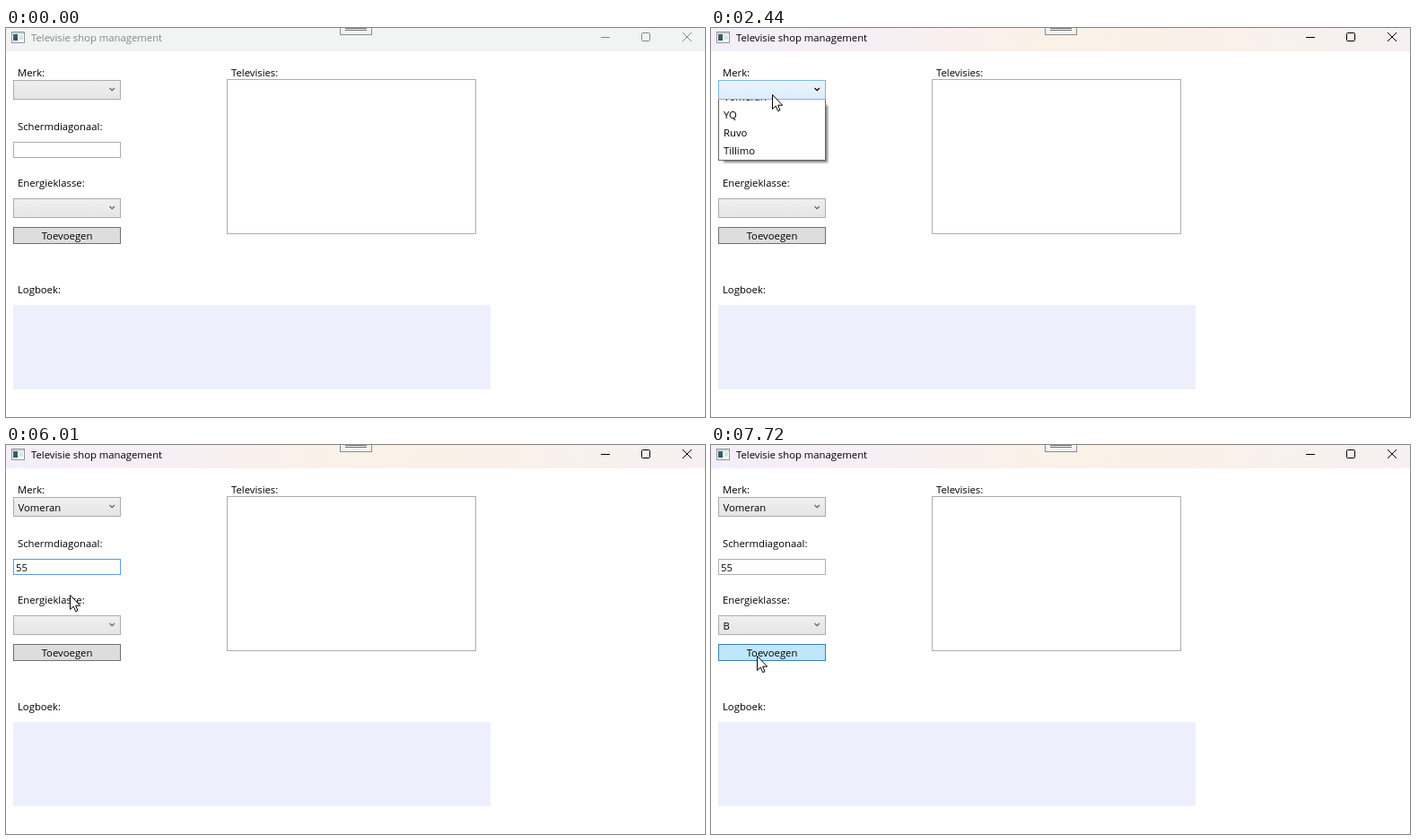
Write an HTML page with a canvas that moves like this. It is 779 px wide and 434 px high and loops after 8000 ms.

```html
<!DOCTYPE html>
<html lang="nl">
<head>
<meta charset="utf-8">
<title>Televisie shop management</title>
<style>
html, body { margin: 0; width: 100%; height: 100%; overflow: hidden; background: #fff; }
canvas { display: block; }
</style>
</head>
<body>
<canvas id="stage" width="779" height="434"></canvas>
<script>
const c = document.getElementById('stage').getContext('2d');
const LOOP = 8000, STEP = 66.1, START = 780;
const BRANDS = ['Vomeran', 'YQ', 'Ruvo', 'Tillimo'];
const CLASSES = [...'ABCDEF'];

// Pointer moves: start time, end time, goal x, goal y
const MOVES = [
  [780, 980, 547, 371],
  [1110, 1990, 73, 65],
  [2300, 2430, 68, 74],
  [2700, 2965, 60, 97],
  [3430, 3885, 74, 139],
  [4030, 4345, 74, 134],
  [5800, 6395, 66, 203],
  [6865, 7255, 54, 234],
  [7400, 7715, 51, 235]
];

let now, mouse;
const clamp = u => Math.min(1, Math.max(0, u));
const on = (from, to = LOOP) => now >= from - 20 && now < to - 20;

// Sideways speed is even, vertical speed eases out, so long moves bend.
function pointer() {
  let x = 676, y = 342;
  for (const [from, to, goalX, goalY] of MOVES) {
    const rest = 1 - clamp((now - from) / (to - from));
    x = goalX + (x - goalX) * rest;
    y = goalY + (y - goalY) * rest ** 1.6;
  }
  return { x: Math.round(x), y: Math.round(y), shown: on(780, 5080) || on(5870) };
}

function hover(top, bottom) {
  return mouse.shown && mouse.x >= 8 && mouse.x < 128 && mouse.y >= top && mouse.y < bottom;
}

function box(x, y, w, h, fill, edge) {
  c.fillStyle = fill;
  c.fillRect(x, y, w, h);
  if (!edge) return;
  c.strokeStyle = edge;
  c.lineWidth = 1;
  c.strokeRect(x + .5, y + .5, w - 1, h - 1);
}

function text(s, x, y, color = '#000') {
  c.fillStyle = color;
  c.fillText(s, x, y);
}

function line(d, color, width = 1) {
  c.strokeStyle = color;
  c.lineWidth = width;
  c.stroke(new Path2D(d));
}

function gradient(x0, y0, x1, y1, colors) {
  const g = c.createLinearGradient(x0, y0, x1, y1);
  colors.forEach((color, i) => g.addColorStop(i / (colors.length - 1), color));
  return g;
}

function titleBar() {
  const ink = on(2240) ? '#000' : '#868686';
  const mica = ['#f3eefa', '#f8eff3', '#faf2e6', '#f9f1ea', '#f6f0f2'];
  box(0, 0, 779, 26, on(2380) ? gradient(0, 0, 779, 0, mica) : '#f2f4f4');
  box(6, 4, 15, 13, '#fdfdfd', '#8d969a');
  box(7, 5, 13, 2, '#d0d6d9');
  box(8, 7, 5, 7, gradient(8, 7, 13, 14, ['#2f6a86', '#37504f']));
  box(15, 8, 4, 5, '#dde2e4');
  text('Televisie shop management', 28, 15, ink);
  line('M663 10.5h10', ink);
  line('M709.5 5.5h7q1 0 1 1v7q0 1-1 1h-7q-1 0-1-1v-7q0-1 1-1z', ink);
  line('M754 5l10 10M764 5l-10 10', ink);
  box(372, -2, 36, 10, '#f2f2f2', '#8c8c8c');
  line('M378 .5h24M378 2.5h24', '#777');
}

function combo(y, value) {
  const hot = hover(y, y + 22);
  const fill = hot ? ['#ecf4fc', '#dcecfc'] : ['#f0f0f0', '#e5e5e5'];
  box(8, y, 120, 22, gradient(0, y, 0, y + 22, fill), hot ? '#7eb4ea' : '#acacac');
  line(`M115.5 ${y + 9}l2.7 2.7l2.7-2.7`, hot ? '#000' : '#606060', 1.2);
  text(value, 13.5, y + 16);
}

// The list slides down out of the lower edge of its combo box.
function popup(y, items, opened) {
  const h = items.length * 20 + 2;
  const shown = Math.round(h * clamp((now - opened + 70) / 148));
  const top = y + shown - h;
  c.save();
  c.shadowColor = 'rgba(0,0,0,.5)';
  c.shadowBlur = 2.4;
  c.shadowOffsetX = c.shadowOffsetY = 1.8;
  box(12, y + 4, 116, shown - 4, '#fff');
  c.restore();

  c.save();
  c.beginPath();
  c.rect(8, y, 120, shown);
  c.clip();
  box(8, top, 120, h, '#fff', '#646464');
  items.forEach((item, i) => {
    const row = top + 1 + i * 20;
    if (hover(Math.max(row, y), row + 20))
      box(9, row, 118, 20, 'rgba(38,160,218,.12)', 'rgba(38,160,218,.66)');
    text(item, 14, row + 14);
  });
  c.restore();
}

function textBox() {
  const edge = on(4150, 6470) ? '#569de5' : hover(127, 145) ? '#7eb4ea' : '#abadb3';
  const value = on(5340) ? '55' : on(5150) ? '5' : '';
  box(8, 127, 120, 18, '#fff', edge);
  text(value, 11, 141);
  if (on(4150, 4680) || on(5150, 5870))
    box(11 + Math.round(value.length * 6.4), 128, 1, 16, '#000');
}

function button() {
  const hot = hover(222, 241);
  box(8, 222, 120, 19, hot ? '#bee6fd' : '#ddd', hot ? '#3c7fb1' : '#707070');
  c.textAlign = 'center';
  text('Toevoegen', 68, 236);
  c.textAlign = 'left';
}

function cursor() {
  if (!mouse.shown) return;
  c.save();
  c.translate(mouse.x, mouse.y);
  if (hover(127, 145)) {
    line('M-3 -7.5h2.5l1 1l1-1h2.5M-3 7.5h2.5l1-1l1 1h2.5M.5 -6.5v13', '#000');
  } else {
    const d = 'M.5 .5v16l3.7-3.5l2.5 5.7l2.3-1l-2.4-5.5h5.1z';
    c.fillStyle = '#fff';
    c.fill(new Path2D(d));
    line(d, '#000');
  }
  c.restore();
}

function draw(time) {
  now = START + STEP * Math.floor((time % LOOP - START + 5) / STEP);
  mouse = pointer();

  c.font = "11.3px 'Open Sans', 'Noto Sans', sans-serif";
  box(0, 0, 779, 434, '#fff');
  titleBar();
  text('Merk:', 13, 54);
  text('Schermdiagonaal:', 13, 114);
  text('Energieklasse:', 13, 177);
  text('Logboek:', 13, 296);
  text('Televisies:', 251, 54);
  box(246, 57, 278, 173, '#fff', '#abadb3');
  box(8, 309, 532, 94, '#eeeffd');

  combo(58, on(3230) ? BRANDS[0] : '');
  textBox();
  combo(190, on(7460) ? CLASSES[1] : '');
  button();
  if (on(2380, 3230)) popup(80, BRANDS, 2380);
  if (on(6470, 7460)) popup(212, CLASSES, 6470);
  cursor();
}

function tick() {
  draw(performance.now());
  requestAnimationFrame(tick);
}
tick();
</script>
</body>
</html>
```
